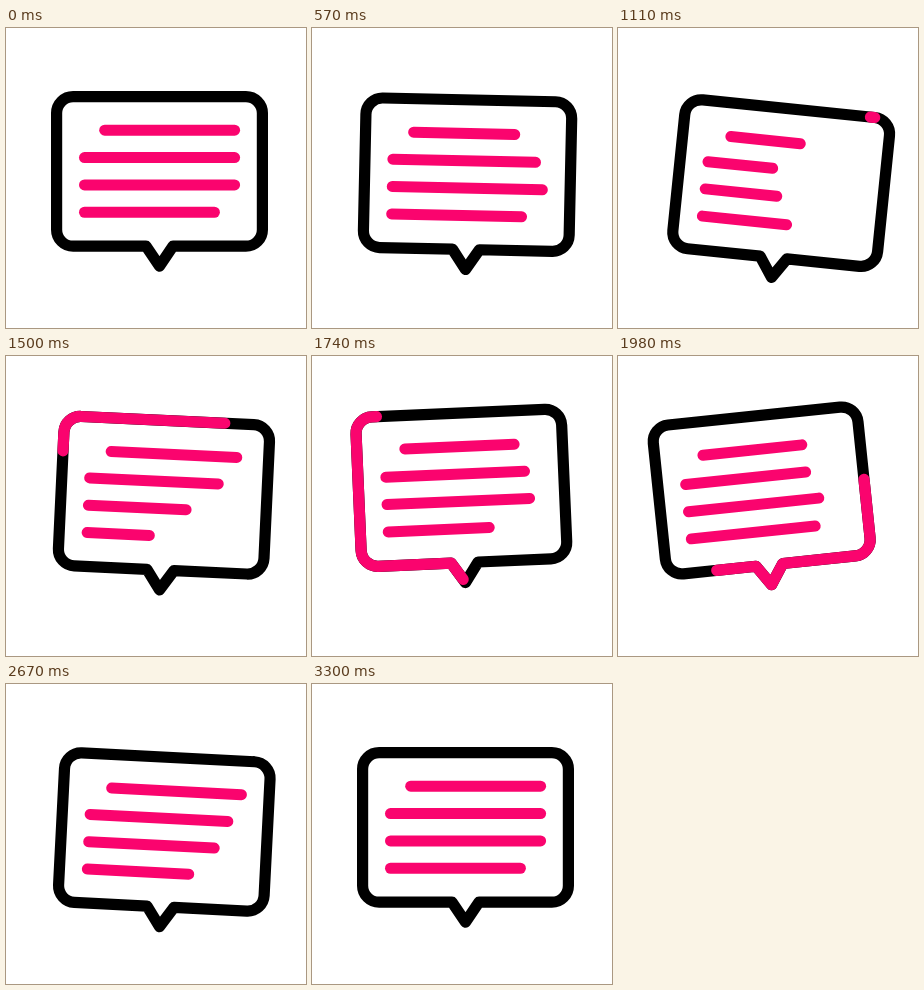
An HTML page with a canvas that plays this animation: 300 px wide and 300 px high, repeating every 3600 ms.

```html
<!DOCTYPE html>
<html lang="en">
<head>
<meta charset="utf-8">
<title>Speech bubble</title>
<style>
html, body { margin: 0; width: 100%; height: 100%; overflow: hidden; background: #fff; }
canvas { display: block; width: 300px; height: 300px; }
</style>
</head>
<body>
<canvas id="stage"></canvas>
<script>
const LOOP = 3600, STEP = 30, SIZE = 300;
const PINK = '#fa046e', BLACK = '#000';
const canvas = document.getElementById('stage');
const ctx = canvas.getContext('2d');
const dpr = window.devicePixelRatio || 1;
canvas.width = canvas.height = SIZE * dpr;

// Bubble centre line
const L = 50.6, R = 256.4, T = 68.6, B = 218.2, RAD = 16.5;
const TIP = { x: 153.5, y: 238.2, half: 13.5 };
const STROKE = 11.2;
const PERIMETER = 2 * (R - L + B - T - 4 * RAD) + 2 * Math.PI * RAD
  - 2 * TIP.half + 2 * Math.hypot(TIP.half, TIP.y - B);

const clamp = u => Math.min(1, Math.max(0, u));
const ease = u => (1 - Math.cos(Math.PI * clamp(u))) / 2;
const ramp = (t, from, to) => ease((t - from) / (to - from));
const hump = (t, from, to) => Math.sin(Math.PI * clamp((t - from) / (to - from)));

// Swing from rest through each [time, value] in turn
function swing(t, start, ...stops) {
  let value = 0, from = start;
  for (const [to, next] of stops) {
    value += (next - value) * ramp(t, from, to);
    if (t < to) break;
    from = to;
  }
  return value;
}

const tilt = t => swing(t, 300, [1200, 6], [2060, -6.2], [2710, 3], [3300, 0]);
const lift = t => swing(t, 330, [1020, 12], [1800, -12], [2510, 5], [3300, 0]);

// Share of a text line that is showing: one deep dip, then a shallow one
const shown = t => 1 - .57 * hump(t, 300, 1560) ** 2 - .24 * hump(t, 1470, 2650);

// Anticlockwise from the right end of the top edge
const bubble = new Path2D();
bubble.moveTo(R - RAD, T);
bubble.arcTo(L, T, L, B, RAD);
bubble.arcTo(L, B, R, B, RAD);
bubble.lineTo(TIP.x - TIP.half, B);
bubble.lineTo(TIP.x, TIP.y);
bubble.lineTo(TIP.x + TIP.half, B);
bubble.arcTo(R, B, R, T, RAD);
bubble.arcTo(R, T, L, T, RAD);

function drawBubble(t) {
  ctx.lineWidth = STROKE;
  ctx.strokeStyle = BLACK;
  ctx.stroke(bubble);

  const head = ramp(t, 1050, 2250) * PERIMETER;
  const tail = ramp(t, 1340, 2570) * PERIMETER;
  if (head - tail < .1) return;
  ctx.setLineDash([head - tail, PERIMETER * 2]);
  ctx.lineDashOffset = -tail;
  ctx.strokeStyle = PINK;
  ctx.stroke(bubble);
  ctx.setLineDash([]);
}

function drawText(t) {
  const left = 78.5, right = 228.6, indent = 20.2;
  ctx.lineWidth = 11;
  ctx.strokeStyle = PINK;
  for (let i = 0; i < 4; i++) {
    const x = left + (i === 0 ? indent : 0);
    const end = right - (i === 3 ? indent : 0);
    const y = 102.2 + i * 27.35;
    ctx.beginPath();
    ctx.moveTo(x, y);
    ctx.lineTo(x + (end - x) * shown(t - i * 150), y);
    ctx.stroke();
  }
}

function draw(t) {
  ctx.setTransform(dpr, 0, 0, dpr, 0, 0);
  ctx.fillStyle = '#fff';
  ctx.fillRect(0, 0, SIZE, SIZE);
  ctx.translate(TIP.x, TIP.y + lift(t));
  ctx.rotate(tilt(t) * Math.PI / 180);
  ctx.translate(-TIP.x, -TIP.y);
  ctx.lineCap = ctx.lineJoin = 'round';
  drawBubble(t);
  drawText(t);
}

const start = performance.now();
function tick() {
  const t = (performance.now() - start) % LOOP;
  draw(Math.floor(t / STEP) * STEP);
  requestAnimationFrame(tick);
}
tick();
</script>
</body>
</html>
```
